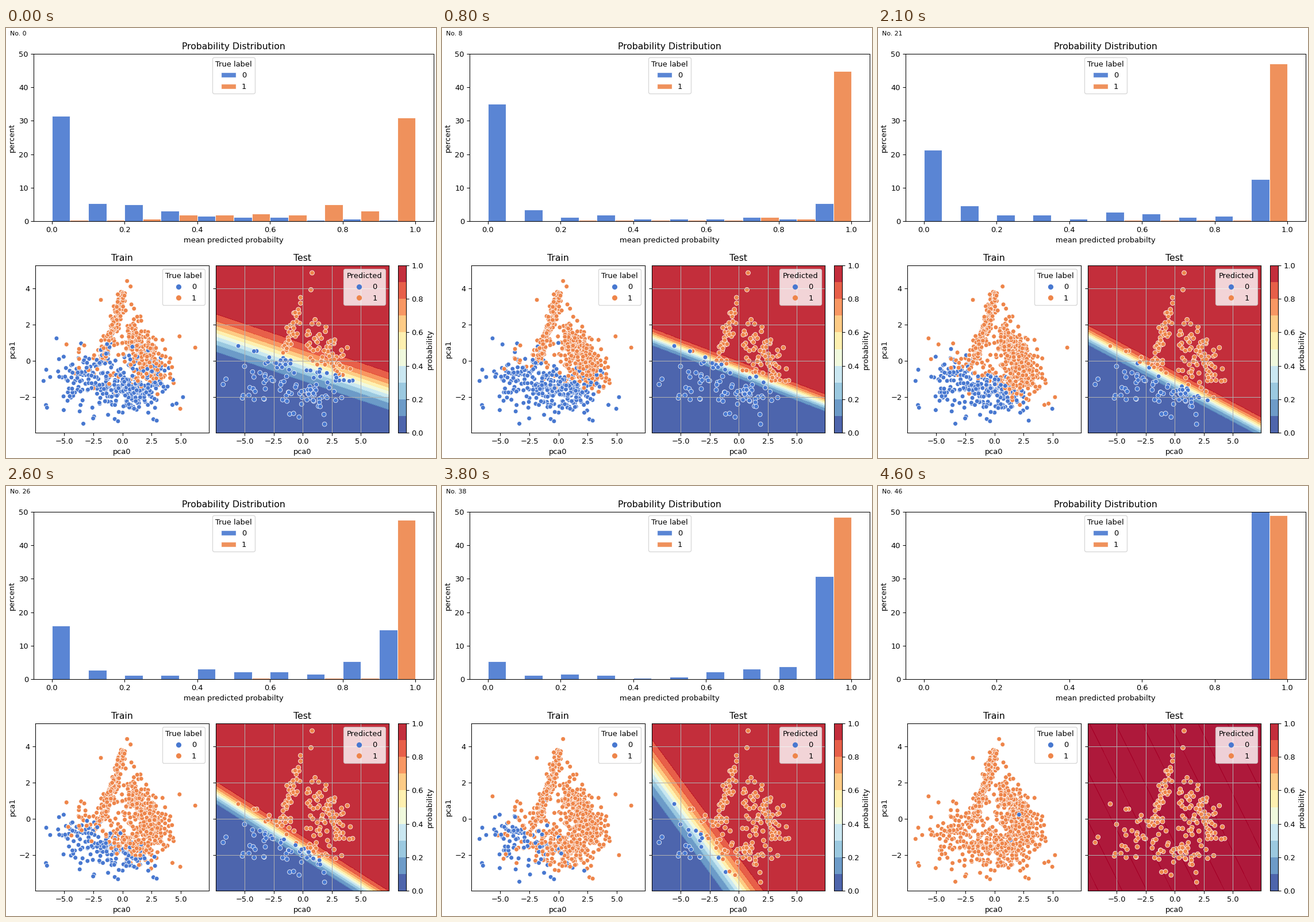
A matplotlib script that plays this animation: 748 by 748 pixels, repeating every 4700 ms.

```python
import numpy as np
import matplotlib.pyplot as plt
from matplotlib.animation import FuncAnimation
from matplotlib.lines import Line2D
from matplotlib.patches import Patch

SIZE, FRAMES, INTERVAL = 748, 47, 100
BLUE, ORANGE = "#4878d0", "#ee854a"
CMAP, ALPHA = "RdYlBu_r", 0.9
XLIM, YLIM = (-7.48, 7.4), (-3.96, 5.26)
UNIT = 100 / 260  # percent per test sample


def track(i, **keys):
    """Linear motion through key values named by their step, as k8=4.8."""
    return np.interp(i, [int(k[1:]) for k in keys], list(keys.values()))


def sigmoid(z):
    return 1 / (1 + np.exp(-z))


def logit(i, x, y):
    slope = track(i, k0=0.215, k16=0.273, k33=0.5, k38=0.87, k46=1.3)
    sharp = track(i, k0=2.13, k8=4.8, k16=4.7, k33=2.9, k38=1.46, k46=0.01)
    bias = track(i, k0=0.13, k8=2.33, k16=3.5, k26=5.75, k33=6.26,
                 k38=5.3, k46=8)
    return sharp * (slope * x + y) + bias


def spread(total, weights, rng):
    share = weights * rng.uniform(0.4, 1.6, len(weights))
    return np.round(total * share / share.sum() / UNIT) * UNIT


def bar_heights(i):
    rng = np.random.default_rng(500 + i)
    t = i / (FRAMES - 1)
    low = track(i, k0=31.5, k8=35, k33=8.7, k46=0)
    high = track(i, k0=0.3, k16=10.4, k26=14.7, k38=30.8, k46=50.6)
    k = np.arange(9)
    sides = (1 - t) * np.exp(-k[:8] / 3) + t * np.exp((k[:8] - 7) / 3)
    label0 = np.r_[low, spread(50.6 - low - high, sides, rng), high]
    top = 31 + 18 * t ** 0.15
    label1 = np.r_[spread(49 - top, np.exp((k - 8) / 4), rng), top]
    return np.r_[label0, label1]


def cloud(seed, n, outliers):
    """A cone on top, a lobe to the right, a bowl below, a loose left tail."""
    rng = np.random.default_rng(seed)
    na, nl, nb, nt = (int(n * f) for f in (0.21, 0.35, 0.27, 0.17))

    y = 3.9 - 4.2 * rng.random(na) ** 0.8
    x = np.interp(y, [-0.3, 0.9, 2.2, 3.9], [-2.0, -1.3, -0.6, 0.15])
    width = np.interp(y, [-0.3, 3.9], [0.36, 0.13])
    arm = np.c_[x + rng.normal(0, width), y + rng.normal(0, 0.15, na)]

    t = rng.random(nl)
    lobe = np.c_[0.5 + 2.9 * t, 1.5 - 2.3 * t] + rng.normal(0, 0.58, (nl, 2))
    bowl = rng.normal((0.7, -1.6), (1.3, 0.6), (nb, 2))
    tail = rng.normal((-2.8, -1.05), (1.55, 0.85), (nt, 2))
    points = np.vstack([arm, lobe, bowl, tail, outliers])
    return points[rng.permutation(len(points))]


def colours(mask):
    return np.where(mask, ORANGE, BLUE)


def add_axes(x0, y0, x1, y1):
    return fig.add_axes([x0 / SIZE, 1 - y1 / SIZE,
                         (x1 - x0) / SIZE, (y1 - y0) / SIZE])


def dot(colour):
    return Line2D([], [], ls="", marker="o", color=colour)


def scatter_panel(box, title, legend):
    ax = add_axes(*box)
    ax.set(xlim=XLIM, ylim=YLIM, title=title, xlabel="pca0",
           xticks=np.arange(-5, 6, 2.5), yticks=[-2, 0, 2, 4])
    ax.legend([dot(BLUE), dot(ORANGE)], ["0", "1"], title=legend,
              loc="upper right")
    return ax, ax.scatter([], [], s=36, edgecolors="w", linewidths=0.6)


fig = plt.figure(figsize=(8, 8), dpi=SIZE / 8)
counter = fig.text(0.01, 1 - 13 / SIZE, "", fontsize="small")

hist = add_axes(48, 45, 744, 336)
hist.set(xlim=(-0.05, 1.05), ylim=(0, 50), title="Probability Distribution",
         xlabel="mean predicted probabilty", ylabel="percent")
bins = np.arange(10) / 10
bars = hist.bar(np.r_[bins, bins + 0.05], np.zeros(20), 0.05, align="edge",
                color=[BLUE] * 10 + [ORANGE] * 10, alpha=ALPHA,
                edgecolor="w", lw=0.8)
hist.legend([Patch(fc=c, ec="w", alpha=ALPHA) for c in (BLUE, ORANGE)],
            ["0", "1"], title="True label", loc="upper center")

train_ax, train = scatter_panel((51, 413, 352.5, 704), "Train", "True label")
train_ax.set_ylabel("pca1")
test_ax, test = scatter_panel((365, 413, 666, 704), "Test", "Predicted")
test_ax.tick_params(labelleft=False)
test_ax.grid(True)

cax = add_axes(682, 413, 696, 704)
cax.imshow(bins[:, None] + 0.05, cmap=CMAP, vmin=0, vmax=1, alpha=ALPHA,
           origin="lower", extent=(0, 1, 0, 1), aspect="auto")
cax.set_xticks([])
cax.yaxis.tick_right()
cax.yaxis.set_label_position("right")
cax.set_ylabel("probability")

pool = cloud(11, 1000, [(-1.85, 3.36), (4.9, 1.35), (6.25, 0.73),
                        (5.2, -2), (0.4, 4.4), (0.7, 4.1)])
points = cloud(4, 200, [(0.8, 4.85), (0.7, 3.92), (-5.55, 0.82),
                        (-6.85, -1.3), (-5.2, -2.05), (-4.2, 0.53)])
test.set_offsets(points)
test.set_zorder(1.2)
gx, gy = np.meshgrid(np.linspace(*XLIM, 50), np.linspace(*YLIM, 50))
field = None


def update(i):
    global field
    counter.set_text(f"No. {i}")
    for bar, h in zip(bars, bar_heights(i)):
        bar.set_height(h)

    rng = np.random.default_rng(100 + i)
    sample = pool[rng.random(len(pool)) < 0.85]
    chance = sigmoid(0.8 * logit(i, *sample.T))
    train.set_offsets(sample)
    train.set_facecolor(colours(rng.random(len(sample)) < chance))

    if field is not None:
        field.remove()
    field = test_ax.contourf(gx, gy, sigmoid(logit(i, gx, gy)), levels=10,
                             cmap=CMAP, alpha=ALPHA, vmin=0, vmax=1)
    test.set_facecolor(colours(logit(i, *points.T) > 0))


anim = FuncAnimation(fig, update, frames=FRAMES, interval=INTERVAL,
                     repeat=True, repeat_delay=0)
plt.show()
```
